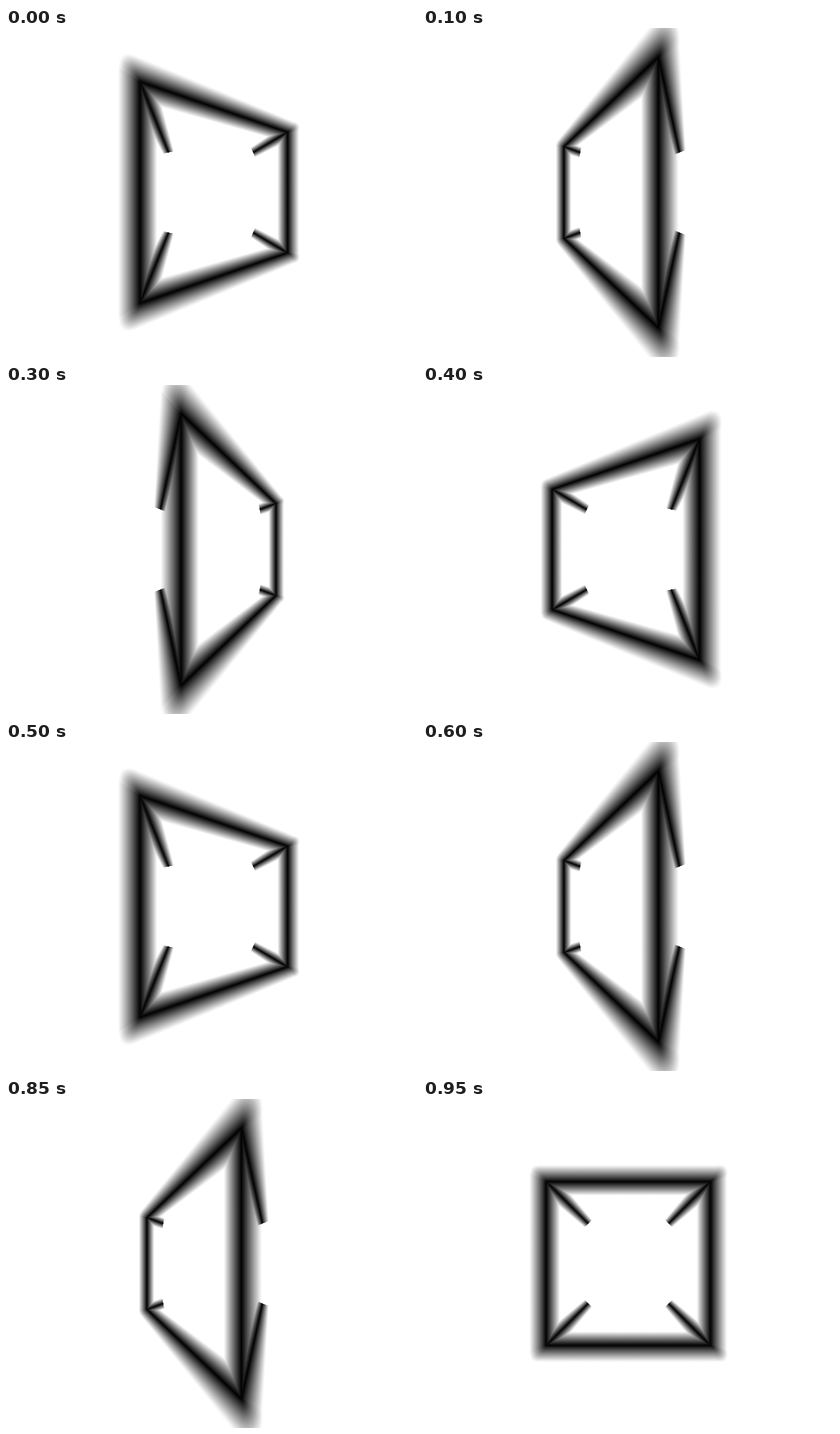
An HTML page without scripts that plays this animation: 600x480 px, repeating every 1000 ms.

```html
<!DOCTYPE html>
<html lang="en">
<head>
<meta charset="utf-8">
<title>Spinning cube</title>
<style>
  html, body { margin: 0; width: 100%; height: 100%; overflow: hidden; background: #fff; }

  .stage {
    position: relative; width: 600px; height: 480px;
    overflow: hidden; isolation: isolate; background: #fff;
    --a: 18deg;
    animation: spin 250ms step-end infinite;
  }

  /* A quarter turn in five steps; the cube looks the same after each quarter. */
  @keyframes spin {
    0%   { --a: 18deg; }
    20%  { --a: 36deg; }
    40%  { --a: -36deg; }
    60%  { --a: -18deg; }
    80%  { --a: 0deg; }
    100% { --a: 18deg; }
  }

  .half { position: absolute; inset: 0; background: #fff; mix-blend-mode: darken; }
  .flip { transform: scaleY(-1); }

  /* Each edge is a soft ribbon turned towards the eye; the darkest one wins. */
  i {
    --r: 15.3px;
    --c: cos(var(--a));
    --s: sin(var(--a));
    --px: calc(var(--x) * var(--c) + var(--s));
    --pz: calc(2 - var(--c) + var(--x) * var(--s));
    --face: calc(atan2(-1 * var(--px), var(--pz)) - var(--a));
    --corner: perspective(120px) translateZ(-120px) rotateY(var(--a))
              translate3d(calc(var(--x) * 120px), -120px, 120px);
    position: absolute;
    left: 300px; top: calc(240px - var(--r));
    width: 240px; height: calc(2 * var(--r));
    transform-origin: 0 50%;
    background: linear-gradient(#fff, #000, #fff);
    mix-blend-mode: darken;
  }
  .l { --x: -1; }
  .r { --x: 1; }

  .post { transform: var(--corner) rotateY(var(--face)) rotateZ(90deg); }
  .beam { transform: var(--corner) rotateX(atan2(-1, 2 * var(--c) - 1)); }
  .spoke {
    width: calc(120px * (1 - var(--x) * tan(var(--a)) + .05 / var(--c)));
    transform: var(--corner)
               rotateZ(atan2(1, -2 * var(--s) - var(--x))) rotateY(90deg);
  }
  .knob {
    left: calc(300px - var(--r)); width: calc(2 * var(--r));
    transform-origin: 50% 50%; border-radius: 50%;
    background: radial-gradient(closest-side, #000, #fff);
    transform: var(--corner) rotateY(var(--face))
               rotateX(atan2(-1, hypot(var(--px), var(--pz))));
  }
</style>
</head>
<body>
<div class="stage">
  <div class="half">
    <i class="post l"></i><i class="post r"></i>
    <i class="beam l"></i>
    <i class="spoke l"></i><i class="spoke r"></i>
    <i class="knob l"></i><i class="knob r"></i>
  </div>
  <div class="half flip">
    <i class="post l"></i><i class="post r"></i>
    <i class="beam l"></i>
    <i class="spoke l"></i><i class="spoke r"></i>
    <i class="knob l"></i><i class="knob r"></i>
  </div>
</div>
</body>
</html>
```
